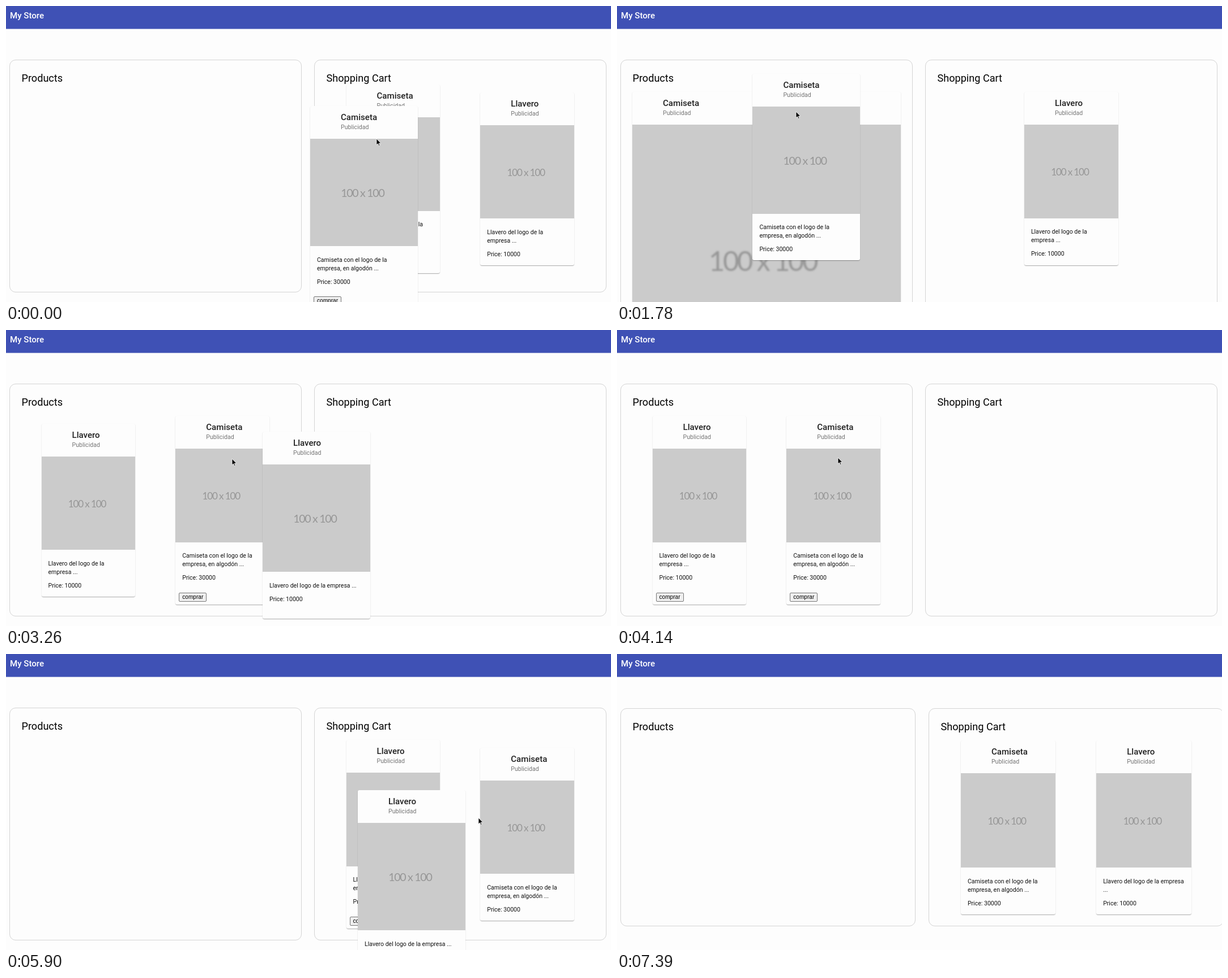
Write an HTML page that moves like this. It is 1068 by 524 pixels and loops after 7840 ms.

```html
<!DOCTYPE html>
<html lang="es">
<head>
<meta charset="utf-8">
<title>My Store</title>
<style>
  html, body { margin: 0; width: 100%; height: 100%; overflow: hidden; background: #fdfdfd; }
  #stage { position: relative; width: 1068px; height: 524px; overflow: hidden; font: 10.55px/15.1px Roboto, sans-serif; color: rgba(0, 0, 0, .87); white-space: pre; }
  #stage * { position: absolute; box-sizing: border-box; }
  header { left: 0; top: 0; width: 100%; height: 41px; background: #3f51b5; border-bottom: 1px solid #8e99d2; color: #fff; }
  header b { left: 7px; top: 7px; font: 500 15.1px/20px Roboto, sans-serif; }
  .panel { border: 1px solid #d4d4d4; border-radius: 11px; }
  .panel h2 { left: 21px; top: 21px; margin: 0; font: 400 18.1px/22px Roboto, sans-serif; color: #000; }
  .card { background: #fdfdfd; border-radius: 3px; box-shadow: 0 1.5px 1px -1px rgba(0, 0, 0, .2), 0 1px 1px rgba(0, 0, 0, .14), 0 1px 2px rgba(0, 0, 0, .12); }
  .card h3 { left: 54px; top: 11px; margin: 0; font: 500 15.1px/18px Roboto, sans-serif; }
  .card small { left: 54px; top: 31px; font-size: 10.6px; line-height: 14px; color: #757575; }
  .img { left: 0; top: 58px; background: #cbcbcb; }
  .img span { left: 48.6%; top: 50.7%; transform: translate(-50%, -50%); font: 1.03em/1 Lato, sans-serif; letter-spacing: -.065em; color: #979797; filter: blur(.03em); }
  .text { left: 12px; }
  .text p { position: static !important; margin: 0 0 9px; color: #111; }
  .buy { left: 6px; width: 49px; height: 16px; border: 1px solid #767676; border-radius: 2px; background: #efefef; color: #000; font: 10.1px/14px "Liberation Sans", Arial, sans-serif; text-align: center; }
  svg { overflow: visible; width: 9px; height: 14px; }
</style>
</head>
<body>
<div id="stage"></div>
<script>
const LOOP = 7840, TICK = 147.4;
const NARROW = { inner: 473.5, gap: 538, top: 152 };
const WIDE = { inner: 478.5, gap: 544, top: 152.6 };
const PREVIEW = 190, SORT_LIFT = 13.2;

const goods = {
  l: { name: 'Llavero', price: 10000, words: ['Llavero del logo de la', 'empresa', '...'] },
  c: { name: 'Camiseta', price: 30000, words: ['Camiseta con el logo de la', 'empresa, en algodón', '...'] }
};

// Tick, products, cart. Capital: with button, *: full-width placeholder, ^: sorted upwards
const scenes = [
  [0, '', 'Cl^'], [4, '', 'lc'], [12, 'c*', 'l'], [15, 'C', 'l'], [21, 'lC', ''], [24, 'LC', ''],
  [33, 'L', 'C*'], [35, 'L', 'c'], [40, '', 'Lc'], [42, '', 'Lc^'], [44, '', 'cl']
];

// Left edge of card i of n, spread evenly over a column
const slotX = (col, i, n, { inner, gap } = NARROW, w = inner * .35) =>
  27 + col * gap + inner * (i + .5) / n - w / 2;
const slot = (...place) => [slotX(...place), NARROW.top];

// Picked up at a slot, carried past a point (with the pointer at tip), dropped into another slot
const drags = [
  { kind: 'C', start: -4, from: slot(0, 0, 1), hold: 0, point: [537, 177], tip: [654, 235], drop: 4, home: slot(1, 0, 2) },
  { kind: 'c', start: 8, from: slot(1, 1, 2), hold: 13, point: [170, 116], tip: [245, 183], drop: 15, home: slot(0, 0, 1) },
  { kind: 'l', start: 20, from: slot(1, 0, 1), hold: 22, point: [453, 180], tip: [399, 228], drop: 24, home: slot(0, 0, 2) },
  { kind: 'C', start: 29, from: slot(0, 1, 2), hold: 33, point: [514, 183.5], tip: [698.5, 258], drop: 35, home: slot(1, 0, 1) },
  { kind: 'L', start: 38, from: slot(0, 0, 1), hold: 40, point: [621, 241], tip: [834, 290], drop: 44, home: slot(1, 1, 2) }
];

// The pointer visits each pick-up and hold, two resting places and then leaves
const pointer = [[7, 934, 230], [15, 233, 177], [48, 970, 490]];
for (const { start, from: [x, y], hold, tip } of drags)
  pointer.push([start, x + 90, y + 74], [hold, ...tip]);
pointer.sort((a, b) => a[0] - b[0]);

const smooth = f => f * f * (3 - 2 * f);

// Eased position on a list of [tick, x, y]; null once the list is over
function along(keys, tick) {
  const i = keys.findIndex(k => k[0] > tick);
  if (i < 1) return null;
  const [t0, x0, y0] = keys[i - 1], [t1, x1, y1] = keys[i];
  const f = smooth((tick - t0) / (t1 - t0));
  return [x0 + (x1 - x0) * f, y0 + (y1 - y0) * f];
}

const hasButton = kind => kind < 'a';
const cardHeight = (kind, w) => 58 + w + (hasButton(kind) ? 110.5 : 83);
const box = (x, y, w, h) => `style="left:${x}px;top:${y}px;width:${w}px;height:${h}px"`;

function describe(item, w) {
  const [a, b, c] = item.words;
  if (w > 300) return `${a} ${b} ${c}`;
  if (item === goods.c || w < 167) return `${a}\n${b} ${c}`;
  return `${a} ${b}${w < 180 ? '\n' : ' '}${c}`;
}

function card(kind, x, y, w, h) {
  const item = goods[kind.toLowerCase()];
  return `<div class="card" ${box(x, y, w, h)}><h3>${item.name}</h3><small>Publicidad</small>` +
    `<div class="img" style="width:${w}px;height:${w}px;font-size:${w / 10}px"><span>100 x 100</span></div>` +
    `<div class="text" style="top:${w + 74.5}px"><p>${describe(item, w)}</p><p>Price: ${item.price}</p></div>` +
    (hasButton(kind) ? `<div class="buy" style="top:${w + 146.8}px">comprar</div>` : '') + '</div>';
}

function store(lists) {
  const layout = /[A-Z*]/.test(lists.join('')) ? NARROW : WIDE;
  const { inner, gap, top } = layout;
  const columns = lists.map(list => {
    const w = list.includes('*') ? inner : inner * .35;
    const kinds = [...list.replace(/[*^]/, '')];
    const h = Math.max(0, ...kinds.map(k => cardHeight(k, w)));
    return { kinds, w, h, y: top - (list.includes('^') ? SORT_LIFT : 0) };
  });
  const tall = Math.max(...columns.map(c => c.h));

  return columns.map(({ kinds, w, h, y }, col) =>
    `<div class="panel" ${box(5.5 + col * gap, top - 57, inner + 43, tall + 78)}><h2>${['Products', 'Shopping Cart'][col]}</h2></div>` +
    kinds.map((kind, i) => {
      const own = cardHeight(kind, w);
      return card(kind, slotX(col, i, kinds.length, layout, w), y + (h - own) / 2, w, own);
    }).join('')).join('');
}

function draw(tick) {
  const [, ...lists] = scenes.filter(s => s[0] <= tick).pop();
  let html = '<header><b>My Store</b></header>' + store(lists);

  for (const { kind, start, from, hold, point, drop, home } of drags) {
    const p = along([[start, ...from], [hold, ...point], [drop, ...home]], tick);
    if (p) html += card(kind, ...p, PREVIEW, cardHeight(kind, NARROW.inner * .35) + 24);
  }
  const p = along(pointer, tick);
  if (p) html += `<svg style="left:${p[0]}px;top:${p[1]}px"><path d="M0 0V11L2.6 8.7 4.3 12.6 6 11.9 4.3 8.1H7.8Z" stroke="#fff" stroke-width=".8"/></svg>`;
  stage.innerHTML = html;
}

const stage = document.getElementById('stage');
const began = performance.now();
let shown = -1;
function frame() {
  const tick = Math.floor((performance.now() - began) % LOOP / TICK);
  if (tick !== shown) draw(shown = tick);
  requestAnimationFrame(frame);
}
frame();
</script>
</body>
</html>
```
